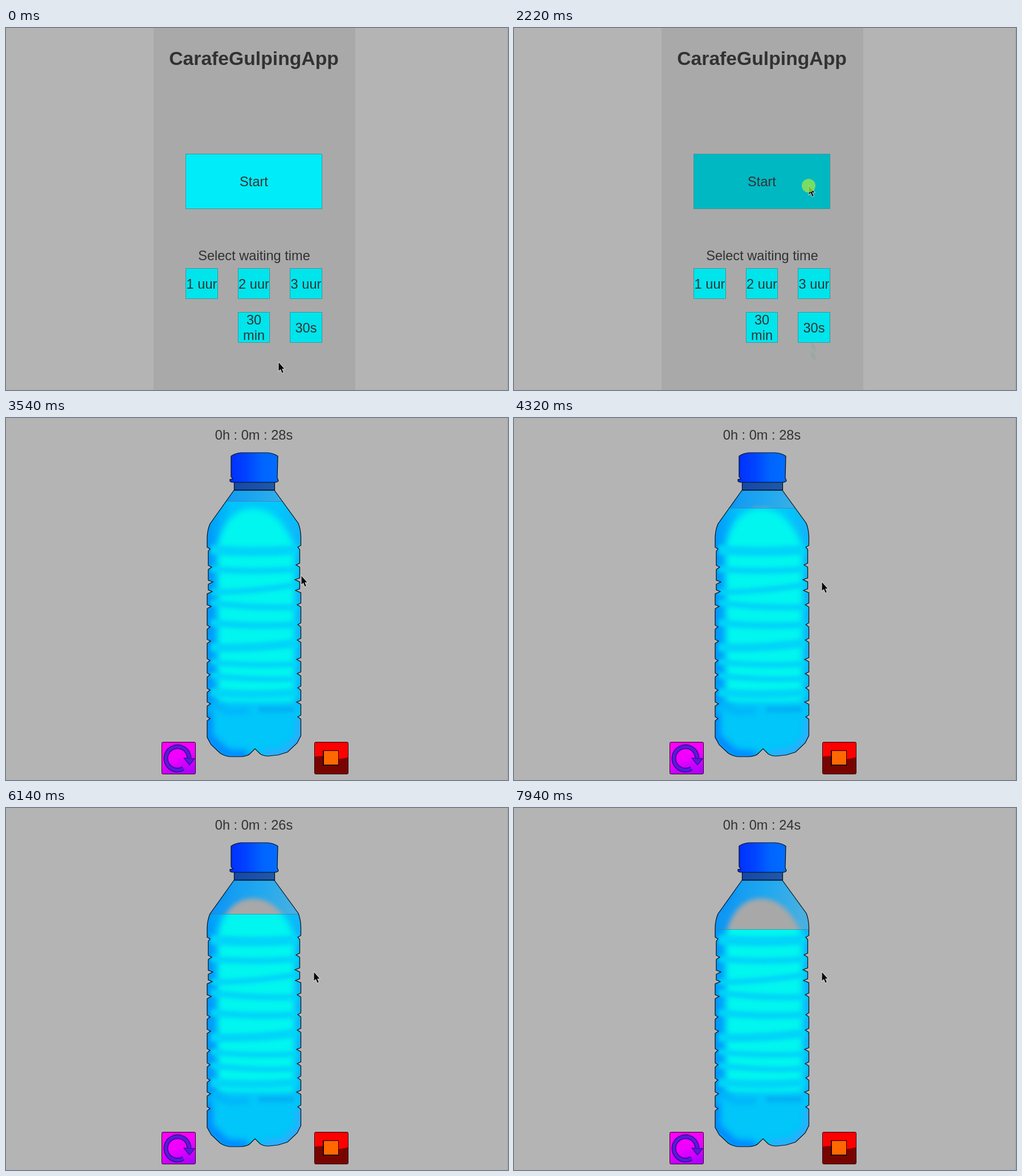
An HTML page with a canvas for the animation above (8000 ms loop, 881x636 px).

```html
<!DOCTYPE html>
<html lang="en">
<head>
<meta charset="utf-8">
<title>CarafeGulpingApp</title>
<style>
html, body { margin: 0; width: 100%; height: 100%; overflow: hidden; background: #b4b4b4; }
canvas { display: block; }
</style>
</head>
<body>
<canvas id="stage" width="881" height="636"></canvas>
<script>
const W = 881, H = 636, LOOP = 8000, OPENED = 2430;
const ctx = document.getElementById('stage').getContext('2d');

// Pointer path: time, x, y
const PATH = [
  [0, 478, 587], [259, 478, 587], [260, 478, 588], [480, 478, 588], [760, 500, 584],
  [1040, 521, 567], [1110, 521, 551], [1180, 520, 536], [1450, 520, 536], [1660, 570, 440],
  [1740, 577, 390], [1900, 545, 300], [2080, 517, 277], [3540, 518, 277], [3820, 540, 280],
  [4000, 549, 284], [4300, 540, 288], [LOOP, 540, 288]
];
const PRESSES = [[1320, 1460], [2140, OPENED]];

const BUTTONS = [
  { x: 315, y: 221, w: 240, h: 97, rgb: [0, 236, 249], lines: ['Start'] },
  { x: 315, y: 422, w: 57, h: 54, lines: ['1 uur'] },
  { x: 407, y: 422, w: 56, h: 54, lines: ['2 uur'] },
  { x: 498, y: 422, w: 57, h: 54, lines: ['3 uur'] },
  { x: 407, y: 499, w: 56, h: 54, lines: ['30', 'min'] },
  { x: 498, y: 499, w: 57, h: 54, lines: ['30s'] }
];

function pointer(t) {
  const i = PATH.findIndex(p => p[0] > t);
  const [t0, x0, y0] = PATH[i - 1], [t1, x1, y1] = PATH[i];
  const k = (t - t0) / (t1 - t0);
  return [Math.round(x0 + (x1 - x0) * k), Math.round(y0 + (y1 - y0) * k)];
}

function text(str, x, y, size = 23.6, weight = '') {
  ctx.font = `${weight} ${size}px "Liberation Sans", Arial, sans-serif`;
  ctx.textAlign = 'center';
  ctx.fillStyle = '#323232';
  ctx.fillText(str, x, y);
}

const arrow = new Path2D('M0 0V15L3.4 12L6 18.4L8.3 17.4L5.7 11.3H10Z');
function drawArrow(x, y, fill, edge) {
  ctx.save();
  ctx.translate(x + .5, y + .5);
  if (edge) {
    ctx.strokeStyle = edge;
    ctx.lineWidth = 1.6;
    ctx.stroke(arrow);
  }
  ctx.fillStyle = fill;
  ctx.fill(arrow);
  ctx.restore();
}

// Bottle shapes
const LEFT = [[230, 358], [262, 361], [288, 363], [305, 362], [331, 360], [367, 358],
  [392, 359], [426, 358], [451, 358], [478, 358], [502, 359], [528, 358]];
const RIGHT = [[227, 512], [258, 509], [284, 507], [303, 508], [328, 511], [363, 512],
  [390, 511], [424, 510], [449, 511], [474, 512], [499, 510], [525, 512]];

function side(notches, edge) {
  return notches.map(([y, x]) => `L${edge(y - 3)} ${y - 3}L${x} ${y}L${edge(y + 4)} ${y + 4}`);
}
const leftEdge = y => y > 232 && y < 306 ? 355 : 353;
const rightEdge = y => y > 228 && y < 302 ? 515.5 : 517.5;
const body = new Path2D(
  'M400 127L358 186Q353 198 353 212' + side(LEFT, leftEdge).join('') +
  'L353 561L360 574L376 589Q384 594 393 595H412Q424 594 428 590L437 581L446 590' +
  'Q452 594 460 594L478 592L494 587L511 571L517.5 558' +
  side(RIGHT, rightEdge).reverse().map(s => 'L' + s.slice(1).split('L').reverse().join('L')).join('') +
  'L517.5 209Q517 195 513 185L471 127Z');
const cap = new Path2D('M395 67Q402 62 412 61H459Q470 62 477 67L476 105L478 110Q477 113 470 113' +
  'H399Q392 113 393 108L398 107L395 103Z');
const dome = new Path2D('M372 500V225C376 195 396 159 433 159C472 159 494 195 506 225V500Z');

function gradient(c, x0, y0, x1, y1, ...colors) {
  const g = c.createLinearGradient(x0, y0, x1, y1);
  colors.forEach((color, i) => g.addColorStop(i / (colors.length - 1), color));
  return g;
}

function layer(paint) {
  const canvas = document.createElement('canvas');
  canvas.width = W;
  canvas.height = H;
  const c = canvas.getContext('2d');
  c.clip(body);
  paint(c);
  return canvas;
}

function brush(c, path, color, width, blur) {
  c.filter = `blur(${blur}px)`;
  c.strokeStyle = color;
  c.lineWidth = width;
  c.stroke(new Path2D(path));
  c.filter = 'none';
}

const full = layer(c => {
  c.fillStyle = gradient(c, 353, 0, 517, 0, '#0098fa', '#00c2fc', '#00c8fc', '#00c8fc', '#12b4f8');
  c.fillRect(350, 120, 170, 480);
  c.filter = 'blur(6px)';
  c.fillStyle = '#00f6ef';
  c.fill(dome);
  c.filter = 'none';
  for (const [y, w, tilt] of [[231, 17, 0], [265, 11, 0], [299, 10, -7], [328, 11, 4], [361, 12, 2],
    [399, 15, -4], [430, 10, 2], [455, 10, 3], [482, 15, 0]]) {
    brush(c, `M358 ${y - tilt}Q430 ${y + 7} 514 ${y + tilt}`, '#00d4f8', w, 3);
  }
  c.filter = 'blur(7px)';
  c.fillStyle = '#00c6fa';
  c.fillRect(345, 505, 180, 100);
  c.filter = 'none';
  brush(c, 'M443 512H505', '#00aef4', 9, 3);
  brush(c, 'M365 503L390 516L425 514', '#00b4fa', 10, 4);
  brush(c, 'M354 515V560L386 590L425 593', '#0088ff', 16, 6);
  brush(c, 'M517 525V560L490 588L450 592', '#34a8ff', 13, 6);
  brush(c, 'M353 205V515', '#0096fa', 7, 3);
  brush(c, 'M518 205V515', '#10b4fa', 6, 3);
});

const empty = layer(c => {
  c.fillStyle = gradient(c, 375, 150, 510, 170, '#1098f4', '#20a8f0', '#48b0e0');
  c.fillRect(350, 120, 170, 480);
  c.filter = 'blur(4px)';
  c.fillStyle = '#a8a8a8';
  c.fill(dome);
  c.filter = 'none';
  brush(c, 'M388 144L357 188V230', '#0c90f4', 6, 3);
});

function drawBottle(t) {
  const level = Math.floor(176.6 + .0152 * (t - 5510));
  ctx.drawImage(empty, 0, 0);
  ctx.drawImage(full, 0, level, W, H - level, 0, level, W, H - level);
  ctx.save();
  ctx.clip(body);
  ctx.fillStyle = 'rgba(95,105,125,.6)';
  ctx.fillRect(350, level, 170, 1);
  ctx.restore();

  ctx.strokeStyle = '#061018';
  ctx.lineWidth = 1.2;
  ctx.stroke(body);
  ctx.fillStyle = gradient(ctx, 400, 0, 471, 0, '#1448a8', '#2058a8');
  ctx.fillRect(400, 112, 71, 15);
  ctx.strokeRect(400.5, 112.5, 71, 14);
  ctx.fillStyle = gradient(ctx, 395, 0, 477, 0, '#0030ff', '#0044ff', '#0064ff', '#006cff');
  ctx.fill(cap);
  ctx.stroke(cap);
}

function iconBox(x, fill) {
  ctx.beginPath();
  ctx.roundRect(x + .5, 569.5, 59, 56, 2);
  ctx.fillStyle = fill;
  ctx.fill();
  ctx.strokeStyle = '#200010';
  ctx.lineWidth = 1;
  ctx.stroke();
}

function drawIcons() {
  iconBox(273, gradient(ctx, 290, 569, 310, 626, '#ff00f8', '#f000ff', '#b000ff'));
  const ring = new Path2D();
  ring.arc(301, 598, 20.5, 1.05, Math.PI * 2 - .05);
  const head = new Path2D('M313 598L330 599L322 609Z');
  ctx.strokeStyle = '#280878';
  ctx.lineWidth = 8;
  ctx.stroke(ring);
  ctx.lineWidth = 2;
  ctx.stroke(head);
  ctx.strokeStyle = ctx.fillStyle = '#5a18e0';
  ctx.lineWidth = 5.5;
  ctx.stroke(ring);
  ctx.fill(head);

  iconBox(541, '#ff0000');
  ctx.fillStyle = '#780400';
  ctx.fill(new Path2D('M542 595Q556 592 570 597T600 596V625H542Z'));
  ctx.fillStyle = '#180000';
  ctx.fillRect(556, 584, 28, 27);
  ctx.fillStyle = '#ff6800';
  ctx.fillRect(558, 585, 25, 24);
}

function drawButton(b, [px, py], pressed) {
  const over = px >= b.x && px < b.x + b.w && py >= b.y && py < b.y + b.h;
  const shade = !over ? 1 : pressed ? .78 : .95;
  const rgb = (b.rgb || [0, 228, 236]).map(v => Math.round(v * shade));
  ctx.fillStyle = '#38989c';
  ctx.fillRect(b.x, b.y, b.w, b.h);
  ctx.fillStyle = `rgb(${rgb})`;
  ctx.fillRect(b.x + 1, b.y + 1, b.w - 2, b.h - 2);
  const mid = b.y + b.h / 2 + 8.5 - (b.lines.length - 1) * 13.5;
  b.lines.forEach((line, i) => text(line, b.x + b.w / 2, Math.round(mid + i * 27)));
}

function drawMenu(t, at, pressed) {
  ctx.fillStyle = '#a9a9a9';
  ctx.fillRect(259, 0, 354, H);
  text('CarafeGulpingApp', 435, 65, 33.7, 'bold');
  text('Select waiting time', 435.5, 408);
  // Faint pointer trail below the last button
  if (t >= 1110) drawArrow(521, 566, '#98a8a8');
  if (t >= 1180) drawArrow(521, 550, '#98a8a8');
  BUTTONS.forEach(b => drawButton(b, at, pressed));
}

function draw(t) {
  const at = pointer(t);
  const pressed = PRESSES.some(([a, b]) => t >= a && t < b);
  ctx.fillStyle = '#b4b4b4';
  ctx.fillRect(0, 0, W, H);
  ctx.fillStyle = '#a4a4a4';
  ctx.fillRect(W - 1, 0, 1, H);
  if (t < OPENED) {
    drawMenu(t, at, pressed);
  } else {
    const left = Math.floor(30 - (t - OPENED + 1) / 1000);
    text(`0h : 0m : ${left}s`, 435, 38);
    drawBottle(t);
    drawIcons();
  }
  drawArrow(...at, '#080808', '#e8e8e8');
  if (pressed) {
    ctx.fillStyle = 'rgba(150,229,77,.8)';
    ctx.beginPath();
    ctx.arc(...at, 12, 0, Math.PI * 2);
    ctx.fill();
  }
}

const start = performance.now();
function tick() {
  draw((performance.now() - start) % LOOP);
  requestAnimationFrame(tick);
}
tick();
</script>
</body>
</html>
```
